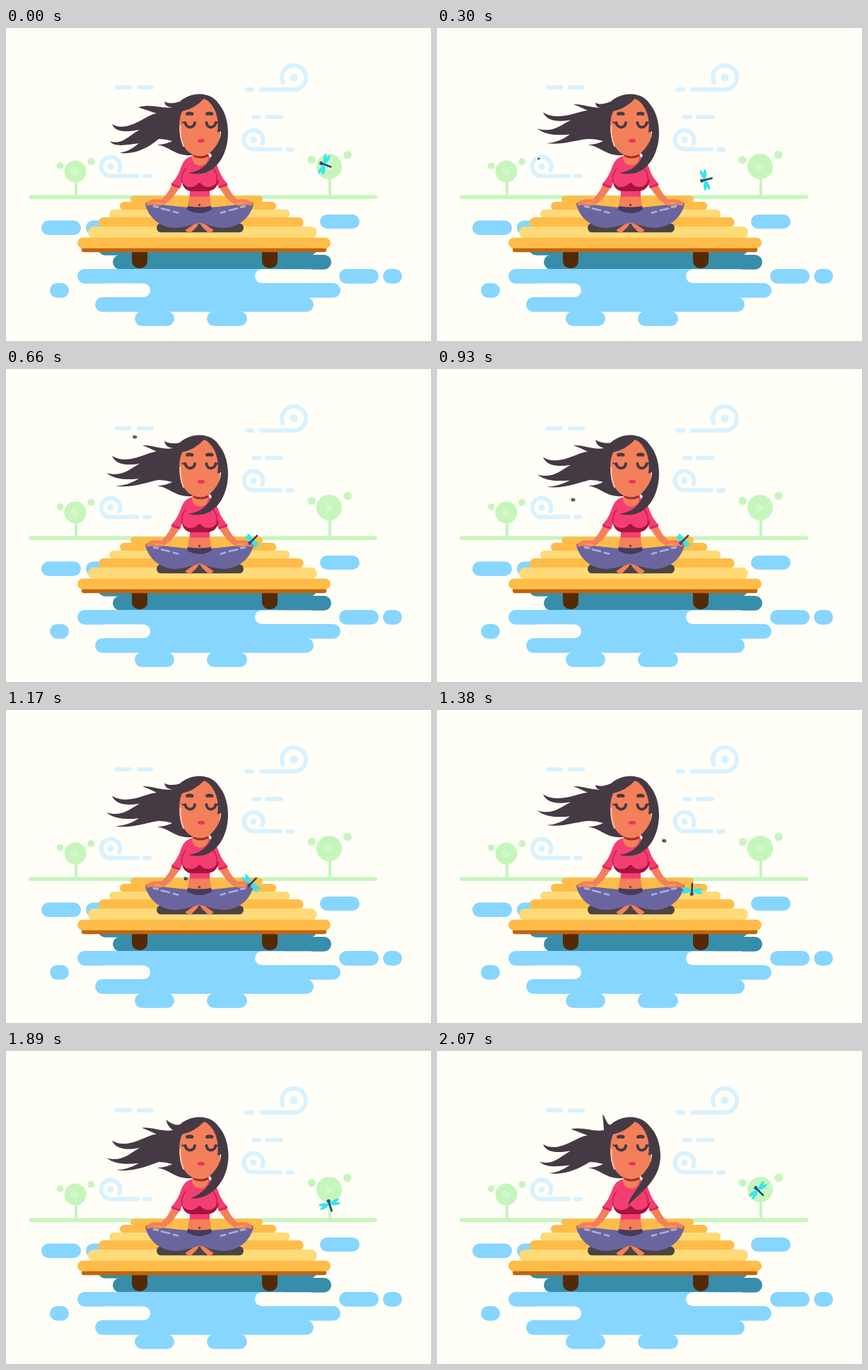
An HTML page with a canvas for the animation above (2.1 s loop, 601 px wide and 443 px high).

```html
<!DOCTYPE html>
<html lang="en">
<head>
<meta charset="utf-8">
<title>Meditation on the pier</title>
<style>
html, body { margin: 0; width: 100%; height: 100%; overflow: hidden; background: #fffff8; }
canvas { display: block; }
</style>
</head>
<body>
<canvas id="stage" width="601" height="443"></canvas>
<script>
const ctx = document.getElementById('stage').getContext('2d');
const LOOP = 2100, STEP = 30, TAU = Math.PI * 2;
const PAPER = '#fffff8', WATER = '#87d6ff', DEEP = '#388daa', WIND = '#d9f2ff', LEAF = '#c6f6bc';
const SKIN = '#f3805a', HAIR = '#453a44', SHIRT = '#f43e72', WINE = '#a5133f', JEANS = '#6b659f';

const clamp = u => Math.min(1, Math.max(0, u));
const smooth = u => u * u * (3 - 2 * u);
const wave = (t, peak, period) => Math.cos(TAU * (t - peak) / period);

function bezier(points, u) {
  while (points.length > 1) {
    points = points.slice(1).map((p, i) => p.map((v, k) => points[i][k] + (v - points[i][k]) * u));
  }
  return points[0];
}

// Catmull-Rom curve through evenly spaced values
function spline(values, s) {
  const i = Math.min(values.length - 3, Math.max(1, Math.floor(s))), u = s - i;
  const [a, b, c, d] = values.slice(i - 1, i + 3);
  return b + u * (c - a + u * (2 * a - 5 * b + 4 * c - d + u * (3 * (b - c) + d - a))) / 2;
}

function shape(d, color) {
  ctx.fillStyle = color;
  ctx.fill(new Path2D(d));
}

function stroke(d, color, width) {
  ctx.strokeStyle = color;
  ctx.lineWidth = width;
  ctx.stroke(new Path2D(d));
}

function dot(x, y, r, color, ry = r) {
  ctx.fillStyle = color;
  ctx.beginPath();
  ctx.ellipse(x, y, r, ry, 0, 0, TAU);
  ctx.fill();
}

function pill(x1, x2, y1, y2, color, r = (y2 - y1) / 2) {
  ctx.fillStyle = color;
  ctx.beginPath();
  ctx.roundRect(x1, y1, x2 - x1, y2 - y1, r);
  ctx.fill();
}

const dash = (x, length, y) => pill(x, x + length, y - 3, y + 3, WIND);

// Water lies in rows of equal height
function row(n, x1, x2, color = WATER) {
  const y = 341 + 20 * n;
  pill(x1, x2, y, y + 20.8, color);
}

function mirrored(draw) {
  draw();
  ctx.save();
  ctx.translate(547, 0);
  ctx.scale(-1, 1);
  draw();
  ctx.restore();
}

function gust(x, y, r, tail, dir) {
  ctx.strokeStyle = WIND;
  ctx.lineWidth = 6;
  ctx.beginPath();
  ctx.moveTo(x + dir * tail, y + r);
  ctx.lineTo(x, y + r);
  ctx.arc(x, y, r, Math.PI / 2, dir > 0 ? .42 : Math.PI - .42, dir < 0);
  ctx.stroke();
  dot(x, y, r / 3, WIND);
}

function tree(x, y, r) {
  stroke(`M${x + 1} ${y}V239`, LEAF, 4);
  dot(x, y, r, LEAF);
  dot(x - r * 1.38, y - r * .52, r * .31, LEAF);
  dot(x + r * 1.44, y - r * .91, r * .32, LEAF);
  ctx.strokeStyle = '#e1fbda';
  ctx.lineWidth = 1.3;
  ctx.beginPath();
  for (let a = 0; a < 11; a += .3) ctx.lineTo(x + Math.cos(a) * a * .55, y + Math.sin(a) * a * .5);
  ctx.stroke();
}

function scenery() {
  ctx.fillStyle = PAPER;
  ctx.fillRect(0, 0, 601, 443);

  for (const x of [154, 185]) dash(x, 24, 84);
  dash(337, 14, 87);
  dash(347, 14, 126);
  dash(366, 26, 126);
  dash(395, 13, 172);
  dash(193, 13, 209.5);
  gust(407, 70, 17, 46, -1);
  gust(350, 158, 13.5, 38, 1);
  gust(148, 196, 13.5, 38, 1);

  pill(32, 525, 236.5, 242, LEAF);
  tree(98, 203, 15.5);
  tree(457, 196, 18);

  pill(50, 106, 272.5, 293, WATER);
  pill(113, 160, 272.5, 293, WATER);
  pill(444, 500, 264, 284, WATER);
  row(-2, 130, 440, DEEP);
  row(-1, 151, 460, DEEP);
  row(0, 101, 400);
  row(0, 471, 527);
  row(0, 533, 560);
  row(1, 62, 89);
  row(1, 180, 473);
  row(2, 126, 435);
  row(3, 182, 238);
  row(3, 284, 341);
  pill(352, 440, 341.5, 361, PAPER);
  pill(130, 204, 361.5, 381, PAPER);
}

function pier() {
  for (const x of [178, 362]) pill(x, x + 22, 310, 340, '#542a05', [0, 0, 10, 10]);
  pill(107, 453, 309, 317.3, '#bf6610', 3);
  const edges = [311.7, 296.7, 281, 268, 257, 246, 237.5];
  for (let i = 5; i >= 0; i--) {
    const color = i === 1 || i === 3 ? '#ffda78' : '#ffbc48';
    pill(101 + 15 * i, 459 - 19.2 * i, edges[i + 1], edges[i] + (i ? 1 : 0), color);
  }
  pill(213, 336, 276.5, 289.3, '#4c4345');
}

// Breeze sways the hair; a stronger gust passes at the loop's ends
function breeze(t) {
  const sway = -2.8 * wave(t, 330, 1080);
  const late = clamp((t - 1700) / 370) ** 2;
  const gust = clamp(1 - t / 300) ** 2 + late * .6;
  return { sway, late, gust };
}

function backHair({ sway, late, gust }) {
  const bx = 224 + 10 * late, by = 103 - sway + 2 * gust - 13 * late;
  const dx = gust * 6, x2 = 193 - dx;
  const y2 = 108 + 4 * gust, y3 = 124 + sway + 13 * gust;
  const y4 = 148 + sway * 1.3 + 13 * gust, y5 = 165 + sway * .7 + 11 * gust;
  const n2 = y2 + 9, n3 = y3 + 9 - 3 * gust, n4 = y4 + 6 - 5 * gust;
  shape(`M303 112C295 90 263 88 246 104
    C241 106 ${bx + 6} ${by + 4 + 5 * late} ${bx} ${by}Q${bx + 1} ${by + 9} 236 112
    C222 115 207 107 ${x2} ${y2}Q${x2 + 8} ${y2 + 3} 213 ${n2}
    C200 ${n2} 172 ${y3 + 12} 150 ${y3 - 2}C155 ${y3 + 11} 173 ${n3 + 3} 189 ${n3}
    C174 ${n3 + 8} 164 ${y4 + 4} ${142 + dx * .8} ${y4 - 2}
    C154 ${y4 + 7} 170 ${n4 + 2} 188 ${n4}
    Q173 ${y5 - 1} ${155 + dx} ${y5}
    C180 ${y5 + 3} 200 ${y5 - 6} 216 157Q225 157 235 160
    Q224 166 210 165C232 166 237 182 263 180L290 160Z`, HAIR);
}

function body() {
  // Neck and waist
  shape('M264 170H287V190H264Z', SKIN);
  shape('M260 234H287L291 257H256Z', SKIN);
  dot(273.5, 250.5, 1.8, '#8f3a2b');

  mirrored(() => {
    shape('M235 221L246 225C239 236 234 243 225 249L216 246C224 240 230 232 235 221Z', SKIN);
    shape('M265 181C253 183 250 190 246 201C242 211 238 216 234 220L235 224L246 227L253 207L274 202V186Z', SHIRT);
    stroke('M235 221.5L245 225', '#c92257', 2.2);
  });
  shape('M264 181H286L296 188L302 213Q299 224 288 229V238.5H260V230Q247 222 248 211L253 187Z', SHIRT);
  shape('M248 214Q250 231 263 231H285Q299 230 301 214L290 224L274 219L259 225Z', WINE);
  mirrored(() => {
    dot(261, 213, 13, SHIRT, 12);
    stroke('M254 199Q247 207 249 217', '#c92257', 1.8);
  });
  dot(274.5, 183, 11.5, SKIN, 11.5);
  stroke('M266 180.5Q275 185.5 285 180.5', '#9b3030', 3.2);

  // Legs
  mirrored(() => {
    shape('M253.5 286L268 276H273L270 281L262 289Q256 290 253.5 286Z', SKIN);
    shape('M198 247Q225 251 258 254L275 261V275C261 279 250 283 237 283C216 281 202 268 197 250Z', JEANS);
  });
  shape('M257 252Q274 255 290 252L291 257Q282 262 274 262Q265 262 256 257Z', '#453b5c');
  mirrored(() => {
    stroke('M209 252.5L215 253.5M220 255.5L231 258M237 260L243 261.5', '#a9b0da', 2.8);
    stroke('M202 248Q207 244 213 245Q219 244 223 247', SKIN, 5);
    stroke('M200 250Q206 248 212 250H219', SKIN, 3);
  });
}

function face() {
  shape('M245 143C245 132 246 125 249 118Q267 114 280 100C294 102 302 122 303 144C304 165 292 181 274 181C255 181 246 162 245 143Z', SKIN);
  stroke('M246.5 139Q245.5 154 251 167', '#fac5ad', 2);
  stroke('M256.5 121.5Q260 120.5 263 121.5M284.5 121.5Q288 120.5 291 121.5', HAIR, 4.8);
  stroke('M253.5 134C255 142.5 266 142.5 267 134M283.5 134C284 142.5 295 142.5 296.5 134', HAIR, 4);
  stroke('M249.5 133.5L254 135.5M299.5 133.5L296 135.5', HAIR, 2.2);
  dot(276, 159.5, 5.2, '#f0335f', 2.8);
}

function frontHair({ late }) {
  const x = 258 + 12 * late, y = 205 + 14 * late, edge = 314 + 2 * late;
  shape(`M268 94C298 92 ${edge} 118 ${edge} 148
    C${edge} 184 ${x + 34 - 19 * late} ${y + 9 - 26 * late} ${x} ${y}
    C${x + 16 - 14 * late} ${y - 2 - 12 * late} 286 194 291 180
    L288 177C299 167 304 156 304 146
    L299 148C302 128 296 111 284 102Z`, HAIR);
}

function flight(t) {
  if (t < 1150) {
    const u = clamp(t / 600);
    return bezier([[450, 193, 200], [359, 212, 165], [348, 243, 135]], u);
  }
  const u = clamp((t - 1150) / 920);
  const [x, y] = bezier([[348, 243], [324, 280], [497, 228], [454, 197]], u);
  return [x, y, 135 - 270 * smooth(u)];
}

function dragonfly(t) {
  const [x, y, heading] = flight(t);
  const span = t >= 600 && t < 1150 ? .75 : 1;
  ctx.save();
  ctx.translate(x, y);
  ctx.rotate(heading * Math.PI / 180);
  ctx.fillStyle = '#35e5ee';
  for (const side of [-1, 1]) {
    for (const tilt of [-.22, .22]) {
      ctx.save();
      ctx.rotate(side * Math.PI / 2 + tilt);
      ctx.beginPath();
      ctx.ellipse(8.2 * span, 0, 7 * span, 2.2, 0, 0, TAU);
      ctx.fill();
      ctx.restore();
    }
  }
  stroke('M4 0H-10', '#24436d', 2.6);
  dot(4.5, 0, 2.6, '#32527c');
  ctx.restore();
}

function bee(t) {
  const size = Math.min(1, clamp((t - 210) / 150), clamp((1830 - t) / 180));
  if (!size) return;
  const pathX = time => spline([360, 144, 182, 204, 321, 281, 190], (time + 60) / 360);
  const x = pathX(t), y = 166 + 72.6 * wave(t, 1155, 1080);
  ctx.save();
  ctx.translate(x, y);
  ctx.scale(pathX(t + STEP) < x ? -size : size, size);
  dot(-1.5, -2, 2, '#b9e5ef', 1.5);
  dot(-3.5, 0, 1.6, '#b9e5ef', 1.1);
  dot(.5, .5, 2.8, '#2c2522', 2.2);
  stroke('M0 -.8V1.8M2 -.6V1.6', '#efb52c', .8);
  ctx.restore();
}

const start = performance.now();

function frame(now) {
  const t = Math.floor(Math.max(0, now - start) % LOOP / STEP) * STEP;
  const air = breeze(t);
  ctx.lineCap = ctx.lineJoin = 'round';
  scenery();
  pier();
  backHair(air);
  body();
  face();
  frontHair(air);
  dragonfly(t);
  bee(t);
  requestAnimationFrame(frame);
}
requestAnimationFrame(frame);
</script>
</body>
</html>
```
